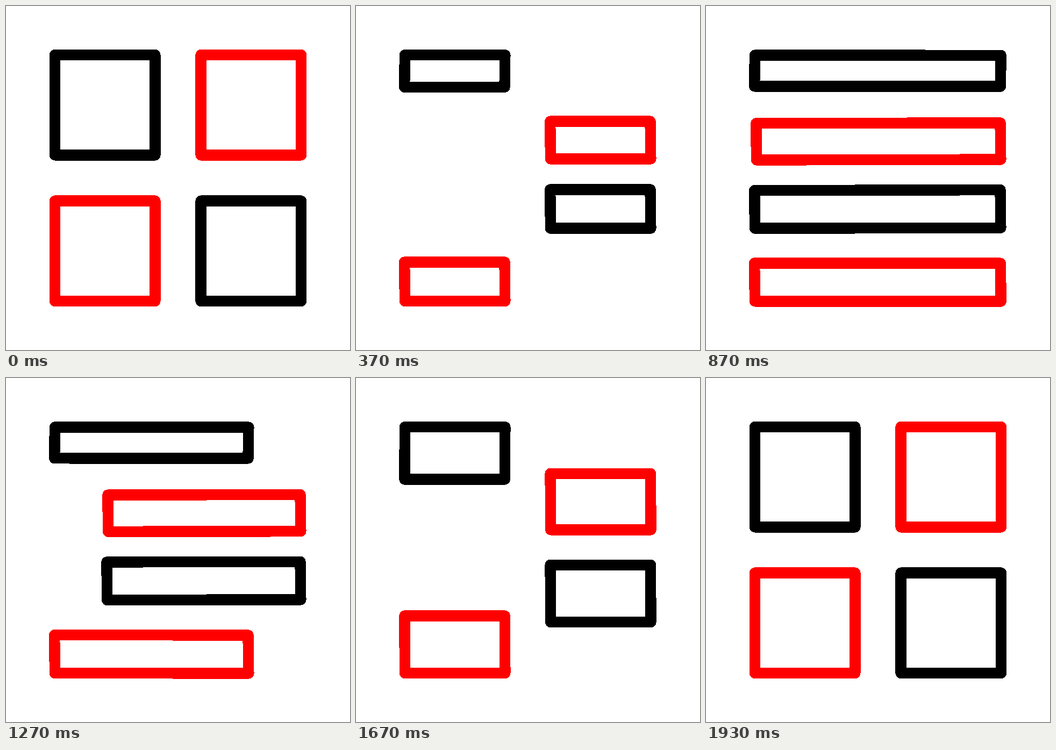
Animation of 640x640 px, one loop 2 s. Source, as an HTML page:

```html
<!DOCTYPE html>
<html lang="en">
<head>
<meta charset="utf-8">
<title>Squares and bars</title>
<style>
  html, body { margin: 0; width: 100%; height: 100%; overflow: hidden; background: #fff; }
  svg { display: block; width: 640px; height: 640px; }
  polygon { fill: none; stroke-width: 20.4px; stroke-linejoin: round; shape-rendering: crispEdges; }
</style>
</head>
<body>
<svg id="stage" viewBox="0 0 640 640"></svg>
<script>
const LOOP = 2000, FPS = 30;
const MARGIN = 91, PITCH = 271.6, SIZE = 186.4;

// top, bottom: edges of the flattened box; far: where its free side stretches to.
const boxes = [
  { col: 0, row: 0, color: '#000', lean: -0.4, top: 91.2, bottom: 149.1, far: 548.3 },
  { col: 1, row: 0, color: '#f00', lean: 0.4, top: 216.4, bottom: 284.6, far: 93.6 },
  { col: 0, row: 1, color: '#f00', lean: 0.4, top: 478, bottom: 549, far: 548.3 },
  { col: 1, row: 1, color: '#000', lean: 0.4, top: 341.2, bottom: 411.8, far: 90.6 }
];

const stage = document.getElementById('stage');
for (const box of boxes) {
  box.node = document.createElementNS('http://www.w3.org/2000/svg', 'polygon');
  box.node.setAttribute('stroke', box.color);
  stage.append(box.node);
}

const mix = (a, b, k) => a + (b - a) * k;

// cubic-bezier(.42, 0, .58, 1), clamped to 0..1
function ease(x) {
  let lo = 0, hi = 1;
  for (let i = 0; i < 24; i++) {
    const s = (lo + hi) / 2, r = 1 - s;
    if (1.26 * s * r * r + 1.74 * s * s * r + s * s * s < x) lo = s;
    else hi = s;
  }
  return lo * lo * (3 - 2 * lo);
}

const ramp = (tick, start, end) => ease((tick - start) / (end - start));

function place({ col, row, lean, top, bottom, far, node }, flat, wide) {
  const x = MARGIN + PITCH * col, y = MARGIN + PITCH * row;
  const shift = -(0.45 + 0.6 * col) * flat;
  const t = mix(y, top, flat), b = mix(y + SIZE, bottom, flat);
  const slant = lean * flat;

  let left = x + shift, right = x + SIZE + shift;
  if (col) left = mix(left, far, wide);
  else right = mix(right, far, wide);

  // The stretched side sags, the fixed side half as much.
  const sag = (0.6 + 1.3 * col) * wide;
  const sagL = col ? sag : sag / 2, sagR = col ? sag / 2 : sag;

  node.setAttribute('points', [
    left - slant, t + sagL, right - slant, t + sagR,
    right + slant, b + sagR, left + slant, b + sagL
  ].join(' '));
}

function draw(ms) {
  // Ticks of 1/30 s fall on the nearest 10 ms.
  const tick = Math.floor((Math.floor(ms % LOOP / 10) * 10 + 4) * FPS / 1000);
  const flat = ramp(tick, 0, 12) - ramp(tick, 45, 58);
  const wide = ramp(tick, 12, 26) - ramp(tick, 33, 45);
  for (const box of boxes) place(box, flat, wide);
}

function loop(now) {
  draw(now);
  requestAnimationFrame(loop);
}
draw(0);
requestAnimationFrame(loop);
</script>
</body>
</html>
```
